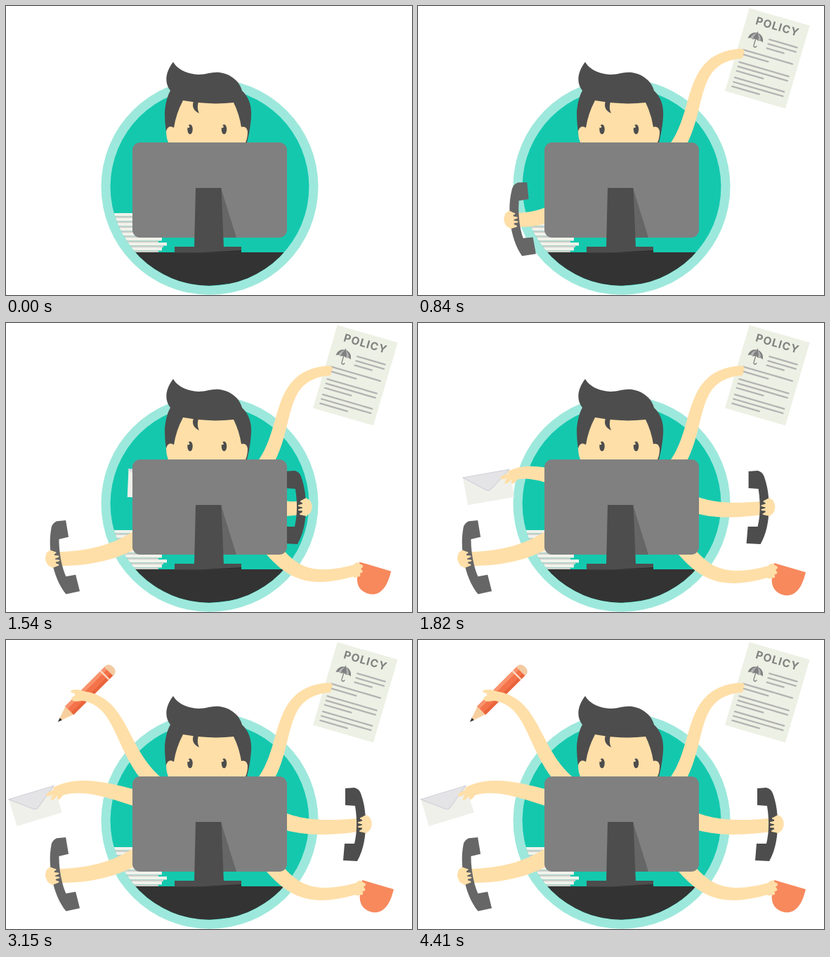
These frames come from a looping animation (578x413 px, 8910 ms). An HTML page:

```html
<!DOCTYPE html>
<html lang="en">
<head>
<meta charset="utf-8">
<title>Busy desk</title>
<style>
html, body { margin: 0; width: 100%; height: 100%; overflow: hidden; background: #fff; }
svg { display: block; width: 100%; height: 100%; }
text { font: 700 15.5px Inter, Roboto, sans-serif; letter-spacing: 1px; text-anchor: middle; }
</style>
</head>
<body>
<svg viewBox="0 0 578 413">
  <defs>
    <clipPath id="disc"><circle cx="290" cy="258.3" r="141.4"/></clipPath>
    <path id="phone" d="M-22-52L-9-53Q-2-51 0-45C6-28 7-15 7 0C7 20 3 38-5 52L-25 51L-23 27H-9C-5 11-5-9-8-27L-22-28Z"/>
    <g id="grip" fill="#ffdfa8">
      <path d="M5-13Q13-13 14-8Q17-3 15 3Q14 10 6 11L2 8V-10Z"/>
      <path d="M8-13L0-9L8-6L-3-3L8 0L-3 3L8 4L-1 9L8 11Z" stroke="#ffdfa8" stroke-width="2" stroke-linejoin="round"/>
    </g>
  </defs>

  <circle cx="290" cy="258.2" r="154.5" fill="#9de8dc"/>
  <circle cx="290" cy="258.3" r="141.4" fill="#14c8ae"/>
  <g clip-path="url(#disc)">
    <g id="stack"></g>
    <path d="M140 352H397C381 377 353 394 318 397L290 400V413H140Z" fill="#333"/>
  </g>

  <g id="limbs"></g>

  <path d="M238 80C244 90 256 97 274 98C286 98 292 94 304 95C320 97 333 108 336 121C346 130 350 143 349 158C348 175 345 187 343 195H232C229 188 226 172 226 152C227 138 230 128 234 121C225 110 227 94 238 80Z" fill="#4d4d4d"/>
  <path d="M252 135Q290 142 324 138Q332 154 335 173Q342 171 344 179Q344 189 341 195H231Q228 188 228 179Q231 169 239 174Q242 154 252 135Z" fill="#ffdfa8"/>
  <path d="M274 137C272 144 273 149 275 153.500C268 150 264 145 267 136Z" fill="#4d4d4d"/>
  <g id="eyes"></g>
  <path id="lids" d="M259 180.500L262 182.500L265 180.500M307.500 180.500L310.500 182.500L313.500 180.500" fill="none" stroke="#e3c08c" stroke-width="1.500"/>

  <rect x="180" y="195" width="220" height="136" rx="11" fill="#808080"/>
  <path d="M306 260L328 331H308Z" fill="#666"/>
  <path d="M240 344H335V352.500H240ZM270 260H306.500L310 345H268Z" fill="#4d4d4d"/>
  <path d="M275 352.500L335 349V352.500Z" fill="#303030"/>
</svg>

<script>
const LOOP = 8910, STEP = 70, LAST = 4410, REACH = 700, BLINK = 3780;
const SKIN = '#ffdfa8';
const $ = id => document.getElementById(id);
const mix = (a, b, u) => a + (b - a) * u;
const clamp = u => Math.min(1, Math.max(0, u));
const ease = u => (1 - Math.cos(Math.PI * u)) / 2;

function add(parent, tag, attrs = {}, html = '') {
  const el = document.createElementNS('http://www.w3.org/2000/svg', tag);
  for (const k in attrs) el.setAttribute(k, attrs[k]);
  el.innerHTML = html;
  parent.append(el);
  return el;
}

const finger = (x, y, rx, ry, turn = 0) =>
  `<ellipse cx="${x}" cy="${y}" rx="${rx}" ry="${ry}" fill="${SKIN}" transform="rotate(${turn} ${x} ${y})"/>`;

// Paper stack with uneven right edges
for (let i = 0; i < 8; i++) {
  const y = 296 + 7 * i, right = 224 + 5 * Math.cos(2 * (i - 6));
  add($('stack'), 'rect', { x: 140, y, width: right - 140, height: 4.5, fill: '#f1f2eb' });
  add($('stack'), 'rect', { x: 140, y: y + 4.5, width: right - 145, height: 2.5, fill: '#cfd0cb' });
}

const eyes = [262, 310.5].map(x => add($('eyes'), 'g', {},
  `<ellipse cx="${x}" cy="176.300" rx="3.700" ry="7" fill="#4d4d4d"/>` +
  `<circle cx="${x - 2.4}" cy="172.500" r="1.700" fill="${SKIN}"/>`));

// Lines of one paragraph; the last one is short
function paragraph(x, y, count, last) {
  let d = '';
  for (let i = 0; i < count; i++) d += `M${x} ${y + 6.6 * i}H${i < count - 1 ? 81 : last}`;
  return d;
}

const policy = `<g transform="translate(-6 -66)">
  <path d="M0 0H89.500V123.500H0Z" fill="#edf0e4"/>
  <text x="46" y="19.700" fill="#808080">POLICY</text>
  <g transform="translate(1.500 -1)">
    <path d="M8.500 43C9 28 30 28 30.500 43Q27 40 23.500 42.500Q19.500 39.500 15.800 42.500Q12 40 8.500 43Z" fill="#808080"/>
    <path d="M12 41Q13 35 19.500 32Q15.500 36 15.800 42.500ZM23.500 42.500Q23.500 36 19.500 32Q26 35 27 41Z" fill="#b3b3b3"/>
    <path d="M19.500 30V50Q19.500 53 22 52.500Q23.500 52 23.500 50" fill="none" stroke="#808080" stroke-width="1.300"/>
  </g>
  <path d="${paragraph(40, 35, 3, 65) + paragraph(8, 59.5, 2, 47) + paragraph(8, 78, 3, 47) + paragraph(8, 101, 3, 48)}"
    stroke="#b3b3b3" stroke-width="2.300" stroke-linecap="round"/></g>`;

const envelope = `<g transform="translate(-66 -10)">
  <path d="M0 0H67V40H0Z" fill="#eff0ea"/>
  <path d="M0 0H67L37 23Q33 26 29 23Z" fill="#e4e4e6" stroke="#cfcfd8"/></g>`;

const pencil = `<g transform="translate(-24 38) rotate(-45)">
  <path d="M0 0L24-8.500V8.500Z" fill="#f7cf9f"/>
  <path d="M0 0L6-2.300V2.300Z" fill="#333"/>
  <path d="M23-8.500H104V8.500H23Z" fill="#f4734a"/>
  <path d="M23-8.500H104V-3.500H23Z" fill="#f9936d"/>
  <path d="M23 4H104V8.500H23Z" fill="#e9643c"/>
  <path d="M93-8.500H95.500V8.500H93Z" fill="#fbd9c3"/>
  <path d="M102-8.500H106Q111-7 111 0T106 8.500H102Z" fill="#f3cba2"/></g>`;

const cup = `<path transform="translate(3.300 -13.500)" fill="#f7895d"
  d="M0 0H47V8C47 26 40 40 25 40S3 30 2 14Z"/>`;

// Each limb grows from `home` behind the screen to its final `curve`; `bend` delays the sideways move
const limbs = [
  { start: 35, home: [292, 268], curve: [366, 205, 405, 150, 382, 75, 459, 68], turn: [-5, 16.3], bend: 3,
    item: policy, over: true, width: [21, 14],
    hand: finger(1, -3, 4, 4) + finger(1, 3, 4, 4) },
  { start: 460, home: [225, 265], curve: [200, 299, 165, 325, 125, 337, 72, 337], turn: [0, -9.5],
    item: '<use href="#phone" fill="#666" transform="scale(-1 1)"/>', width: [24, 20],
    hand: '<use href="#grip" transform="scale(-1 1)"/>' },
  { start: 910, home: [345, 290], curve: [375, 318, 405, 355, 430, 375, 500, 355], turn: [16, 16.5],
    item: cup, width: [23, 16],
    hand: finger(2, -1, 7, 11) + finger(6, -8, 4, 2.7) + finger(7, -1, 4.5, 2.8) + finger(6, 5, 4, 2.7) },
  { start: 1260, home: [375, 264], curve: [385, 255, 420, 269, 455, 270, 505, 264], turn: [0, 0],
    item: '<use href="#phone" fill="#4d4d4d"/>', width: [24, 19],
    hand: '<use href="#grip"/>' },
  { start: 1386, home: [262, 222], curve: [195, 229, 150, 216, 105, 200, 70, 218], turn: [5, -17],
    item: envelope, over: true, width: [24, 15],
    hand: finger(-5, -1, 9, 3, -10) + finger(-2, 4, 8, 2.8, -35) + finger(6, 6, 7, 3, -40) },
  { start: 1700, home: [240, 262], curve: [222, 212, 158, 165, 172, 80, 98, 79], turn: [35, 0],
    item: pencil, over: true, width: [23, 13],
    hand: finger(4, -5, 10, 3, 5) + finger(5, 4, 10, 4.5, -8) }
];

for (const limb of limbs) {
  limb.root = add($('limbs'), 'g');
  limb.arm = add(limb.root, 'path', { fill: SKIN });
  const item = add(limb.root, 'g', {}, limb.item);
  if (limb.over) limb.root.append(limb.arm);
  limb.held = [item, add(limb.root, 'g', {}, limb.hand)];
}

// Tapered band along a cubic curve
function band([x0, y0, x1, y1, x2, y2, x3, y3], [w0, w1]) {
  const left = [], right = [], n = 28;
  const at = (u, a, b, c, d) =>
    (1 - u) ** 3 * a + 3 * (1 - u) ** 2 * u * b + 3 * (1 - u) * u * u * c + u ** 3 * d;
  const slope = (u, a, b, c, d) =>
    (1 - u) ** 2 * (b - a) + 2 * (1 - u) * u * (c - b) + u * u * (d - c);
  for (let i = 0; i <= n; i++) {
    const u = i / n;
    const x = at(u, x0, x1, x2, x3), y = at(u, y0, y1, y2, y3);
    const dx = slope(u, x0, x1, x2, x3), dy = slope(u, y0, y1, y2, y3);
    const r = mix(w0, w1, u) / 2 / Math.hypot(dx, dy);
    left.push(`${(x - dy * r).toFixed(2)} ${(y + dx * r).toFixed(2)}`);
    right.unshift(`${(x + dy * r).toFixed(2)} ${(y - dx * r).toFixed(2)}`);
  }
  return `M${left.concat(right).join('L')}Z`;
}

function draw(t) {
  for (const { start, home, curve, turn, bend = 1, width, root, arm, held } of limbs) {
    root.style.display = t > start ? '' : 'none';
    if (t <= start) continue;
    const up = ease(clamp((t - start) / REACH)), side = up ** bend;
    const p = curve.map((v, i) => mix(home[i % 2], v, i % 2 ? up : side));
    const place = `translate(${p[6]} ${p[7]}) rotate(${mix(...turn, side)})`;
    arm.setAttribute('d', band(p, width));
    held.forEach(g => g.setAttribute('transform', place));
  }
  const open = clamp(Math.abs(t - BLINK) / (2 * STEP));
  eyes.forEach(eye => eye.setAttribute('transform', `translate(0 ${181 * (1 - open)}) scale(1 ${open})`));
  $('lids').style.display = open ? 'none' : '';
}

function tick() {
  const t = performance.now() % LOOP;
  draw(Math.min(LAST, Math.floor(t / STEP) * STEP));
  requestAnimationFrame(tick);
}
tick();
</script>
</body>
</html>
```
